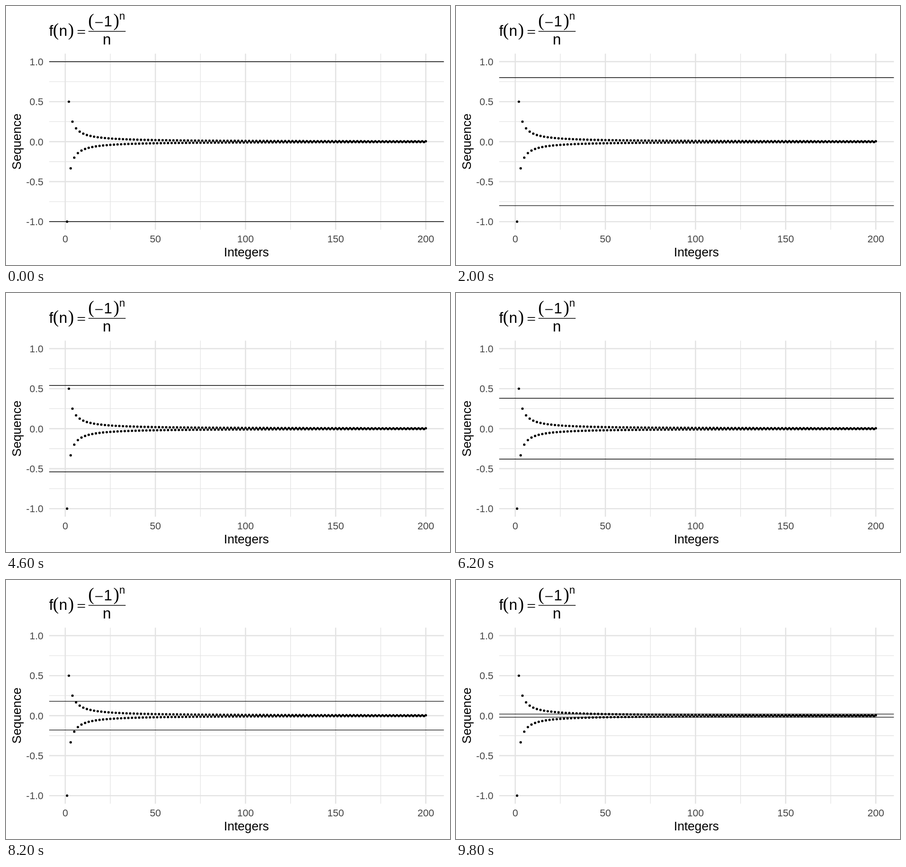
Write an HTML page that moves like this. It is 980 by 572 pixels and loops after 10000 ms.

```html
<!DOCTYPE html>
<html lang="en">
<head>
<meta charset="utf-8">
<title>Alternating sequence</title>
<style>
  html, body { margin: 0; width: 100%; height: 100%; overflow: hidden; background: #fff; }
  svg { display: block; font-family: "Liberation Sans", Arial, sans-serif; }
  .grid { stroke: #e3e3e3; }
  .tick { font-size: 22px; fill: #444; }
  .title { font-size: 27.5px; text-anchor: middle; }
  .formula { font-size: 33px; }
  .paren { font: 39px "Liberation Serif", Times, serif; }
  .bound { stroke: #000; stroke-width: 1.35; }
</style>
</head>
<body>
<svg id="stage" width="980" height="572" viewBox="0 0 980 572">
  <g class="formula">
    <text x="95" y="66">f</text>
    <text class="paren" x="103.5" y="66">(</text>
    <text x="117" y="66">n</text>
    <text class="paren" x="137" y="66">)</text>
    <path d="M158 54.2H174.5M158 60.4H174.5" stroke="#000" stroke-width="1.8"/>
    <path d="M182 56H264" stroke="#000" stroke-width="1.3"/>
    <text class="paren" x="181.5" y="44.5">(</text>
    <path d="M197 36.5H213.5" stroke="#000" stroke-width="1.9"/>
    <text x="216" y="44.5">1</text>
    <text class="paren" x="237" y="44.5">)</text>
    <text x="250" y="30" font-size="23.1">n</text>
    <text x="213.5" y="85">n</text>
  </g>
  <text class="title" x="530.7" y="553">Integers</text>
  <text class="title" transform="translate(33 299.5) rotate(-90)">Sequence</text>
</svg>
<script>
const stage = document.getElementById("stage");
const panel = { left: 95.3, right: 966.5, top: 105.2, bottom: 493.9 };
const xOf = n => 130.8 + n * 3.979;
const yOf = v => 299.6 - v * 176.65;

function add(tag, attributes, text = "") {
  const node = document.createElementNS(stage.namespaceURI, tag);
  for (const key in attributes) node.setAttribute(key, attributes[key]);
  node.textContent = text;
  return stage.appendChild(node);
}

const horizontal = (v, attributes) =>
  add("line", { x1: panel.left, x2: panel.right, y1: yOf(v), y2: yOf(v), ...attributes });
const vertical = (n, attributes) =>
  add("line", { x1: xOf(n), x2: xOf(n), y1: panel.top, y2: panel.bottom, ...attributes });
const gridStyle = isMajor => ({ class: "grid", "stroke-width": isMajor ? 2.67 : 1.33 });

for (let i = 0; i <= 8; i++) {
  const n = i * 25, v = i / 4 - 1, isMajor = i % 2 === 0;
  vertical(n, gridStyle(isMajor));
  horizontal(v, gridStyle(isMajor));
  if (isMajor) {
    add("text", { class: "tick", x: xOf(n), y: 522, "text-anchor": "middle" }, n);
    add("text", { class: "tick", x: 82.5, y: yOf(v) + 7.9, "text-anchor": "end" }, v.toFixed(1));
  }
}

for (let n = 1; n <= 200; n++) {
  add("circle", { cx: xOf(n), cy: yOf((-1) ** n / n), r: 2.65 });
}

const bounds = [1, -1].map(sign => ({ sign, line: horizontal(sign, { class: "bound" }) }));

// The bounds close in by 0.02 every 200 ms, then jump back.
function draw() {
  const step = Math.floor(performance.now() % 10000 / 200);
  for (const { sign, line } of bounds) {
    const y = yOf(sign * (1 - step * 0.02));
    line.setAttribute("y1", y);
    line.setAttribute("y2", y);
  }
  requestAnimationFrame(draw);
}
draw();
</script>
</body>
</html>
```
